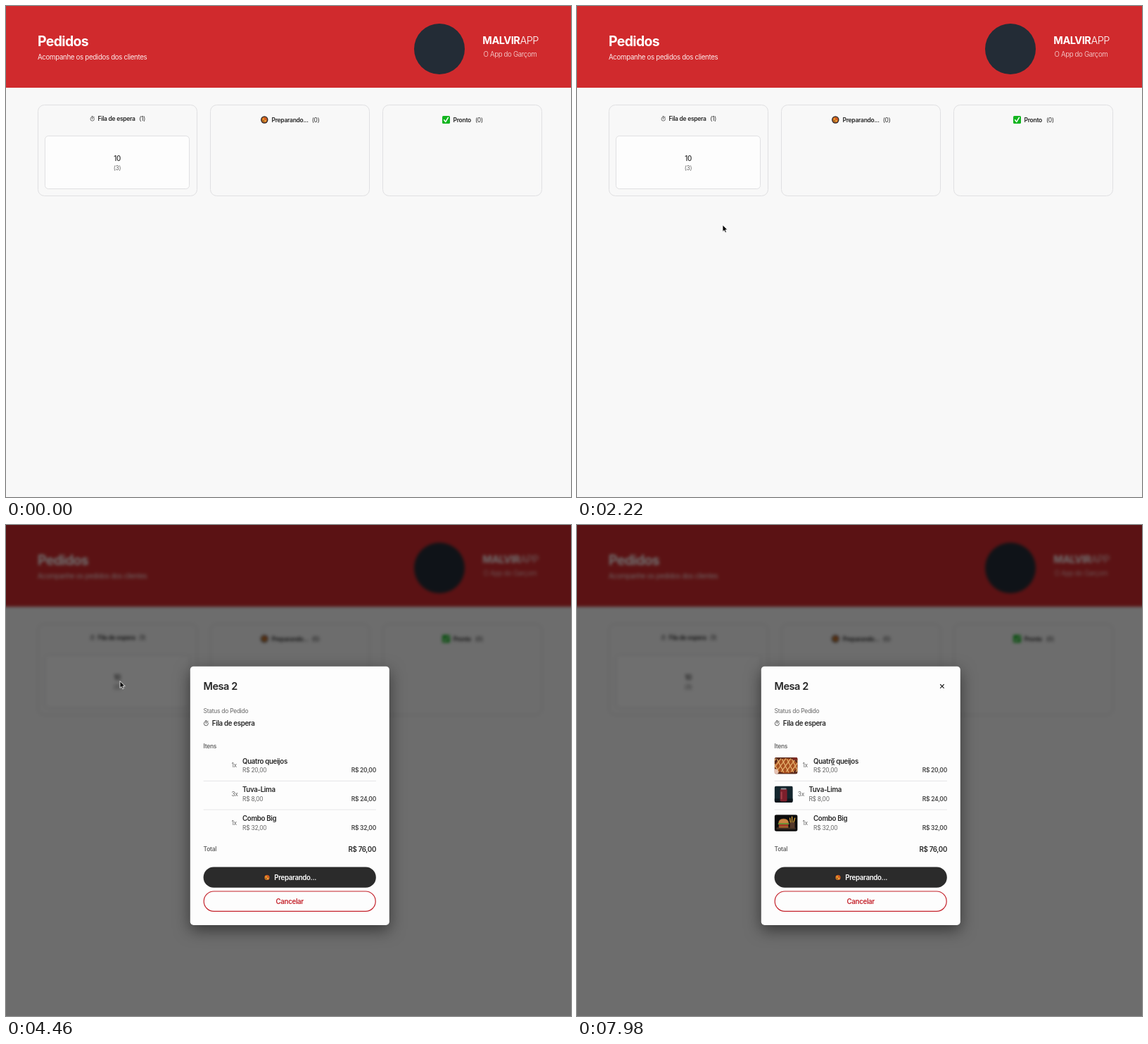
Write an HTML page that moves like this. It is 803 px wide and 697 px high and loops after 8 s.

```html
<!DOCTYPE html>
<html lang="pt-BR">
<head>
<meta charset="utf-8">
<title>Pedidos</title>
<style>
  html, body { margin: 0; width: 100%; height: 100%; overflow: hidden; background: #f8f8f8; }
  svg { display: block; width: 803px; height: 697px; }
  text { font-family: Inter, "Open Sans", sans-serif; letter-spacing: -.032em; white-space: pre; }
  .blur { filter: blur(2.2px); }
  #card { filter: drop-shadow(0 7px 11px rgba(0, 0, 0, .5)); }
</style>
</head>
<body>
<svg id="stage" viewBox="0 0 803 697" xmlns="http://www.w3.org/2000/svg"></svg>
<script>
const LOOP = 8000, OPEN = 4460, CLOSE_ICON = 4500, LOADED = 4540;
const INK = '#262626', GREY = '#666', RED = '#c4222b', LINE = '#e0e0e2';
const SMALL = 8.47, BASE = 9.68;

const text = (x, y, str, size, weight = 400, fill = INK, anchor = 'start') =>
  `<text x="${x}" y="${y}" font-size="${size}" font-weight="${weight}" fill="${fill}" text-anchor="${anchor}">${str}</text>`;
const rect = (x, y, w, h, fill, r = 0, more = '') =>
  `<rect x="${x}" y="${y}" width="${w}" height="${h}" rx="${r}" fill="${fill}" ${more}/>`;
const disc = (x, y, r, fill) => `<circle cx="${x}" cy="${y}" r="${r}" fill="${fill}"/>`;
const path = (d, stroke, w, fill = 'none') =>
  `<path d="${d}" fill="${fill}" stroke="${stroke}" stroke-width="${w}" stroke-linecap="round" stroke-linejoin="round"/>`;
const at = (x, y, s, body) => `<g transform="translate(${x} ${y}) scale(${s})">${body}</g>`;

const watch = (x, y, s = 1) => at(x, y, s,
  `<circle cy=".4" r="2.7" fill="none" stroke="#444" stroke-width=".75"/>` +
  path('M0 .5V-1.2M-.9 -3.3H.9M2.1 -2.2L2.6 -2.7', '#444', .75));
const pan = (x, y, s = 1) => at(x, y, s,
  disc(0, 0, 5.2, '#25262c') + disc(0, 0, 3.9, '#c9641d') + disc(-1.4, -1, 1.3, '#f0a12e') +
  disc(1.5, -1.4, 1, '#e2442c') + disc(1.2, 1.5, 1.2, '#f2b04a') + disc(-1.3, 1.7, .8, '#5c8a34'));
const check = (x, y) => rect(x, y, 11, 11, '#12b51f', 1.6) +
  path(`M${x + 2.6} ${y + 5.8}l2.2 2.6 3.6 -6`, '#fff', 1.5);

const column = x => rect(x, 140.5, 226, 129, 'none', 9, `stroke="${LINE}"`);

function page() {
  return rect(-30, -30, 863, 760, '#f8f8f8') + rect(-30, -30, 863, 146, '#d02a2d') +
    text(45, 56.6, 'Pedidos', 19.4, 700, '#fff') +
    text(45, 76, 'Acompanhe os pedidos dos clientes', BASE, 400, '#fdeeee') +
    disc(616, 61, 36, '#232c36') +
    text(757, 54.4, 'MALVIR<tspan font-weight="300">APP</tspan>', 14.5, 700, '#fff', 'end') +
    text(754.5, 72, 'O App do Garçom', BASE, 300, '#fbe4e4', 'end') +
    [45.5, 290.5, 535.5].map(column).join('') +
    watch(122.7, 160) + text(130.5, 163.4, 'Fila de espera', SMALL, 600) + text(189.2, 163.4, '(1)', SMALL) +
    pan(367.3, 161.5) + text(377.5, 164.5, 'Preparando...', SMALL, 600) + text(434.8, 164.5, '(0)', SMALL) +
    check(620, 156) + text(635.5, 164.5, 'Pronto', SMALL, 600) + text(667, 164.5, '(0)', SMALL) +
    rect(55.5, 184.5, 205, 75, '#fdfdfd', 4.8, `stroke="${LINE}"`) +
    text(158, 219.5, '10', BASE, 500, INK, 'middle') +
    text(158, 233, '(3)', SMALL, 400, GREY, 'middle');
}

// Thumbnails are drawn from their own top left corner.
const pie = () => {
  let lattice = '';
  for (let i = -2; i < 6; i++) lattice += `M${i * 7 - 3} 3l9 18M${i * 7 + 9} 2l-13 18`;
  return rect(0, 0, 33, 24, '#5a2a1c') + '<ellipse cx="17" cy="12" rx="16" ry="10.5" fill="#a9501f"/>' +
    path(lattice, '#e3ae6c', 1.3) + disc(1, 21, 4.5, '#e6c3b4') + rect(26, 0, 7, 4, '#7d2a22');
};
const can = () => rect(0, 0, 26, 24, '#14262e') + rect(0, 18, 26, 6, '#0d171d') +
  rect(8, 4, 10, 18, '#7c1f2b', 2) + rect(9, 3, 8, 2, '#8b8f94', 1) + rect(9, 8, 2, 11, '#a5404a', 1);
const burger = () => rect(0, 0, 33, 24, '#0c0c0d') + rect(3, 18, 27, 3, '#3a2a20', 1) +
  path('M6 12Q6 6 13 6T20 12Z', '#c98542', .5, '#c98542') + rect(5, 12, 16, 2, '#6b9a35', 1) +
  rect(6, 14, 14, 2, '#b8352a', 1) + rect(6, 16, 14, 2.6, '#a9652e', 1) +
  path('M23 12L22 5M25 12V3M27 12L29 5', '#e0a63c', 1.3) + rect(22, 11, 7, 8, '#55392a', 1);

const items = [
  ['1x', 'Quatro queijos', 'R$ 20,00', 'R$ 20,00', 33, pie],
  ['3x', 'Tuva-Lima', 'R$ 8,00', 'R$ 24,00', 26.4, can],
  ['1x', 'Combo Big', 'R$ 32,00', 'R$ 32,00', 33, burger],
];

function item([count, name, price, sum, w, photo], i) {
  const y = 329.8 + i * 40.7;
  const clip = `<clipPath id="clip${i}">${rect(0, 0, w, 23.6, '#000', 3)}</clipPath>`;
  return clip +
    `<g class="late" transform="translate(280.6 ${y})"><g clip-path="url(#clip${i})">${photo()}</g></g>` +
    `<g class="label" data-shift="${w - 33}">` +
    text(320.4, y + 14.6, count, SMALL, 400, GREY) +
    text(336, y + 8.9, name, BASE, 600) + text(336, y + 21.3, price, SMALL, 400, GREY) + '</g>' +
    text(526, y + 21.3, sum, SMALL, 600, '#444', 'end') +
    (i < 2 ? path(`M281 ${y + 33.6}H525.6`, LINE, .8) : '');
}

function modal() {
  return rect(0, 0, 803, 697, '#000', 0, 'opacity=".56"') +
    `<g id="card">${rect(261.8, 200.7, 283, 367.3, '#fdfdfd', 4.8)}</g>` +
    text(280.6, 234.2, 'Mesa 2', 14.5, 600) +
    `<g id="close">${path('M516.5 226.5l4.8 4.8m0 -4.8l-4.8 4.8', INK, 1.2)}</g>` +
    text(280.6, 267.2, 'Status do Pedido', SMALL, 400, GREY) +
    watch(284.3, 281.4, 1.1) + text(292.8, 284.9, 'Fila de espera', BASE, 600) +
    text(280.6, 317.2, 'Itens', SMALL, 500, '#555') + items.map(item).join('') +
    text(280.6, 463, 'Total', SMALL, 500, '#555') + text(526, 463.6, 'R$ 76,00', BASE, 600, INK, 'end') +
    rect(280.6, 485.5, 245.2, 29.3, '#2b2b2b', 14.6) + pan(371, 500.4, .95) +
    text(381.3, 503.7, 'Preparando...', BASE, 600, '#fff') +
    rect(281.2, 520, 244, 28.4, '#fdfdfd', 14.2, `stroke="${RED}" stroke-width="1.2"`) +
    text(403.2, 537.8, 'Cancelar', BASE, 600, RED, 'middle');
}

const arrow = path('M0 0V9.4L2.2 7.4L3.8 10.8L5.4 10L3.9 6.8H6.8Z', '#fff', .8, '#000');
const beamPath = 'M-1.8 -4.6Q0 -4.6 0 -3.4Q0 -4.6 1.8 -4.6M0 -3.4V3.4M-1.8 4.6Q0 4.6 0 3.4Q0 4.6 1.8 4.6M-1 1.2H1';
const beam = path(beamPath, '#fff', 2) + path(beamPath, '#222', .9);

const stage = document.getElementById('stage');
stage.innerHTML = `<g id="page">${page()}</g><g id="modal">${modal()}</g>` +
  `<g id="cursor"><g id="arrow">${arrow}</g><g id="beam">${beam}</g></g>`;
const el = id => document.getElementById(id);
const late = [...document.querySelectorAll('.late')];
const labels = [...document.querySelectorAll('.label')];
const show = (node, on) => node.setAttribute('display', on ? 'inline' : 'none');

// Pointer stops: time, x, y
const stops = [
  [0, 270, 712], [1200, 270, 712], [1540, 226, 420], [1900, 207, 311], [2480, 207, 311],
  [3300, 162, 222], [5400, 162, 222], [5580, 189, 245], [6000, 296, 306], [6500, 364, 336], [8000, 364, 336],
];

function slope(i, k) {
  const a = stops[i - 1], b = stops[i], c = stops[i + 1];
  if (!a || !c || a[k] === b[k] || b[k] === c[k]) return 0;
  return (c[k] - a[k]) / (c[0] - a[0]);
}

function pointer(t) {
  let i = 0;
  while (i < stops.length - 2 && t >= stops[i + 1][0]) i++;
  const a = stops[i], b = stops[i + 1], d = b[0] - a[0], u = (t - a[0]) / d;
  const s = u * u * (3 - 2 * u);
  return [1, 2].map(k => a[k] + (b[k] - a[k]) * s +
    d * u * (1 - u) * (slope(i, k) * (1 - u) - slope(i + 1, k) * u));
}

function draw(t) {
  const open = t >= OPEN, loaded = t >= LOADED;
  el('page').setAttribute('class', open ? 'blur' : '');
  show(el('modal'), open);
  show(el('close'), t >= CLOSE_ICON);
  late.forEach(n => show(n, loaded));
  labels.forEach(n => n.setAttribute('transform', `translate(${loaded ? n.dataset.shift : 0} 0)`));
  const [x, y] = pointer(t);
  const overText = open && x > 336 && y > 326;
  el('cursor').setAttribute('transform', `translate(${x.toFixed(2)} ${y.toFixed(2)})`);
  show(el('arrow'), !overText);
  show(el('beam'), overText);
}

const start = performance.now();
function tick(now) {
  draw(Math.max(0, now - start) % LOOP);
  requestAnimationFrame(tick);
}
draw(0);
requestAnimationFrame(tick);
</script>
</body>
</html>
```
